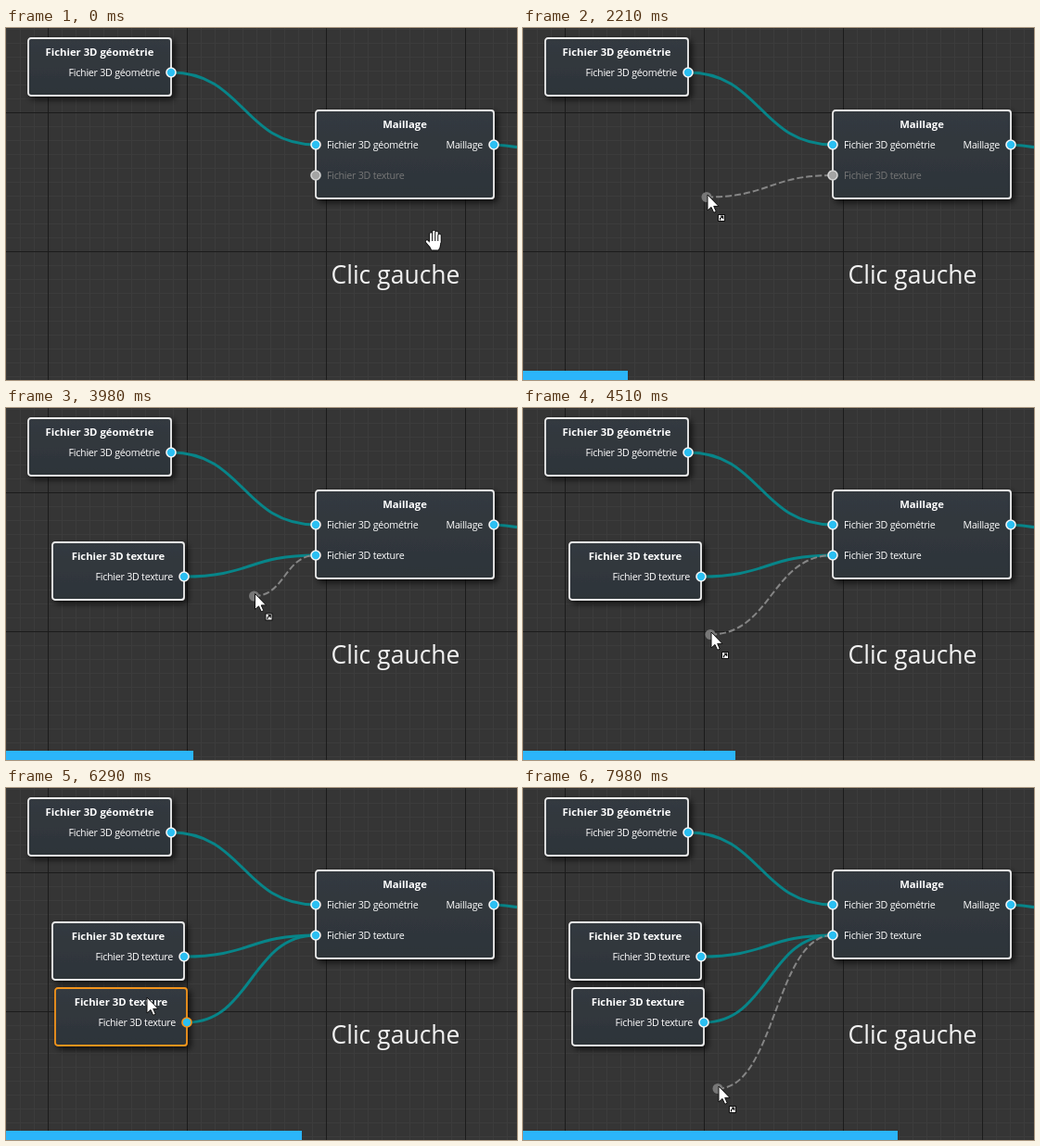
Write an HTML page that moves like this. It is 551 px wide and 380 px high and loops after 8 s.

```html
<!DOCTYPE html>
<html lang="fr">
<head>
<meta charset="utf-8">
<title>Éditeur de nœuds</title>
<style>
  html, body { margin: 0; width: 100%; height: 100%; overflow: hidden; background: #353535; }
  svg { display: block; width: 551px; height: 380px; }
  text { font-family: "Open Sans", "Noto Sans", sans-serif; fill: #fff; }
  .title { font-size: 11.3px; font-weight: 700; text-anchor: middle; }
  .label { font-size: 10.7px; letter-spacing: -.25px; }
  .end { text-anchor: end; }
  .caption { font-size: 26.5px; fill: #f2f2f2; }
  .body { fill: url(#body); stroke: #ececec; stroke-width: 1.8; }
  .port { fill: #2bbff2; stroke: #f4f4f4; stroke-width: 1.6; }
  .wire { fill: none; stroke: #078589; stroke-width: 3; }
  .idle .port { fill: #a4a4a4; stroke: #d4d4d4; }
  .idle text { fill: #777; }
  .selected .body, .selected .port { stroke: #f3941c; }
  .draft path { fill: none; stroke: #858585; stroke-width: 2; stroke-dasharray: 7 3; }
  .draft circle { fill: #777; }
</style>
</head>
<body>
<svg id="stage" viewBox="0 0 551 380">
  <defs>
    <linearGradient id="body" x2="0" y2="1">
      <stop offset="0" stop-color="#343a40"/><stop offset="1" stop-color="#2d3439"/>
    </linearGradient>
    <filter id="shadow" x="-20%" y="-30%" width="150%" height="180%">
      <feDropShadow dx="3" dy="3" stdDeviation="3.5" flood-color="#000" flood-opacity=".75"/>
    </filter>
  </defs>
  <g id="grid" shape-rendering="crispEdges"></g>
  <g id="wires"></g>
  <g id="draft" class="draft"><path/><circle r="5.5"/></g>
  <g id="nodes"></g>
  <text class="caption" x="350.5" y="276">Clic gauche</text>
  <rect id="bar" y="370" height="10" fill="#2bb5fa"/>
  <g id="arrow">
    <path d="M0 0V17L4 13.4 6.7 19.3 9.3 18.2 6.7 12.4H12Z" fill="#fff" stroke="#111" stroke-linejoin="round"/>
    <g id="badge" transform="translate(11 21)">
      <rect x=".5" y=".5" width="7" height="7" fill="#fff" stroke="#111"/>
      <path d="M2.5 6.5V4.5L5 3M3 2.2H5.7V5" fill="none" stroke="#111" stroke-width="1.2"/>
    </g>
  </g>
  <g id="hand" stroke-linecap="round" stroke-linejoin="round"></g>
</svg>
<script>
const LOOP = 8000;
const NS = 'http://www.w3.org/2000/svg';
const $ = id => document.getElementById(id);

function add(parent, tag, attrs = {}, text = '') {
  const el = document.createElementNS(NS, tag);
  for (const k in attrs) el.setAttribute(k, attrs[k]);
  el.textContent = text;
  parent.appendChild(el);
  return el;
}
const show = (el, on) => el.setAttribute('display', on ? 'inline' : 'none');
const move = (el, x, y) => el.setAttribute('transform', `translate(${x} ${y})`);

function curve(x1, y1, x2, y2) {
  const c = Math.min(200, Math.abs(x2 - x1)) / 2;
  return `M${x1} ${y1}C${x1 + c} ${y1} ${x2 - c} ${y2} ${x2} ${y2}`;
}

// Grid: fine lines every 15 px, coarse lines every 150 px
function gridLines(gap, color) {
  let d = '';
  for (let x = 45 % gap; x < 551; x += gap) d += `M${x + .5} 0V380`;
  for (let y = 91 % gap; y < 380; y += gap) d += `M0 ${y + .5}H551`;
  add($('grid'), 'path', { d, stroke: color });
}
gridLines(15, '#3c3c3c');
gridLines(150, '#1b1b1b');

function port(parent, x, y, text, isInput) {
  const g = add(parent, 'g');
  add(g, 'circle', { class: 'port', cx: x, cy: y, r: 5 });
  add(g, 'text', { class: isInput ? 'label' : 'label end', x: x + (isInput ? 12 : -12), y: y + 4 }, text);
  return g;
}

function node(x, y, w, h, title) {
  const el = add($('nodes'), 'g');
  move(el, x, y);
  add(el, 'rect', { class: 'body', width: w, height: h, rx: 3, filter: 'url(#shadow)' });
  add(el, 'text', { class: 'title', x: w / 2, y: 19 }, title);
  return { el, x, y, w, h };
}

const GEO = 'Fichier 3D géométrie', TEX = 'Fichier 3D texture';
const geo = node(24, 11, 154, 62, GEO);
const mesh = node(334, 89, 192, 95, 'Maillage');
const tex1 = node(50, 145, 142, 62, TEX);
const tex2 = node(54, 205, 142, 62, TEX);
port(geo.el, 154, 37, GEO);
port(mesh.el, 0, 37, GEO, true);
port(mesh.el, 192, 37, 'Maillage');
const texIn = port(mesh.el, 0, 70, TEX, true);
for (const n of [tex1, tex2]) port(n.el, 142, 37, TEX);

const wire = d => add($('wires'), 'path', { class: 'wire', d });
wire(curve(178, 48, 334, 126));
wire('M526 126Q540 126.5 553 129');
const wire1 = wire(curve(192, 182, 334, 159));
const wire2 = wire('');

// Open hand: outlined fingers, then the palm
const hand = $('hand');
const palm = 'M-4 1H7.2V4Q7 8 5 10.5H-2Q-3 8 -5.5 4.5Z';
add(hand, 'path', { d: palm, fill: '#111', stroke: '#111', 'stroke-width': 2 });
for (const d of ['M-4 5L-7 1.5', 'M-2.7 2V-6.5', 'M.4 2V-9', 'M3.5 2V-8', 'M6.5 2V-5']) {
  add(hand, 'path', { d, stroke: '#111', 'stroke-width': 4.2 });
  add(hand, 'path', { d, stroke: '#fff', 'stroke-width': 2.4 });
}
add(hand, 'path', { d: palm, fill: '#fff' });

// The screen refreshes in ticks, eleven per block
const BLOCKS = [70, 880, 1740, 2590, 3440, 4280, 5130, 5980, 6830, 7670, 8520];
function tickAt(t) {
  if (t < BLOCKS[0]) return 0;
  const i = BLOCKS.findIndex(b => b > t) - 1;
  const step = (BLOCKS[i + 1] - BLOCKS[i]) / 11;
  return 11 * i + 1 + Math.min(10, Math.floor((t - BLOCKS[i] + 5) / step));
}

// Pointer path: tick, x, y
const PATH = [
  [0, 461, 229], [4, 461, 229], [13, 336, 157], [16, 335, 157], [18, 335, 157],
  [28, 199, 180], [32, 199, 180], [42, 346, 157], [44, 335, 157], [47, 335, 157],
  [57, 202, 244], [59, 203, 242], [62, 203, 242], [71, 153, 215], [74, 153, 215],
  [81, 152, 226], [84, 152, 226], [92, 328, 160], [94, 328, 160], [104, 211, 322], [106, 211, 322]
];
function pointer(n) {
  const i = Math.max(1, PATH.findIndex(p => p[0] >= n));
  const [n0, x0, y0] = PATH[i - 1], [n1, x1, y1] = PATH[i];
  const u = (n - n0) / (n1 - n0), e = u * u * (3 - 2 * u);
  return [x0 + (x1 - x0) * e, y0 + (y1 - y0) * e];
}

const MADE1 = 30, MADE2 = 61, PICK = 74, DROP = 94;
const between = (n, a, b) => n >= a && n < b;
const over = (b, x, y) => x > b.x - 8 && x < b.x + b.w + 8 && y > b.y - 5 && y < b.y + b.h + 5;

function draw(t) {
  const n = tickAt(t), [x, y] = pointer(n);
  const has1 = n >= MADE1, has2 = n >= MADE2;
  const linking = between(n, 19, MADE1) || between(n, 48, MADE2) || n > DROP;

  const u = Math.min(1, Math.max(0, (n - PICK) / 7)), e = u * u * (3 - 2 * u);
  tex2.x = 54 - e;
  tex2.y = 205 + 11 * e;
  move(tex2.el, tex2.x, tex2.y);
  tex2.el.setAttribute('class', between(n, PICK, DROP) ? 'selected' : '');
  wire2.setAttribute('d', curve(tex2.x + 142, tex2.y + 37, 334, 159));
  texIn.setAttribute('class', has1 ? '' : 'idle');
  for (const el of [tex1.el, wire1]) show(el, has1);
  for (const el of [tex2.el, wire2]) show(el, has2);

  const draft = $('draft'), [line, dot] = draft.children;
  show(draft, linking);
  line.setAttribute('d', curve(x - 1, y + 2.5, 334, 159));
  move(dot, x - 1, y + 2.5);

  const boxes = [geo, mesh, ...(has1 ? [tex1] : []), ...(has2 ? [tex2] : [])];
  const arrow = linking || boxes.some(b => over(b, x, y));
  show($('arrow'), arrow);
  show($('hand'), !arrow);
  show($('badge'), linking);
  move($('arrow'), x, y);
  move($('hand'), x, y);
  $('bar').setAttribute('width', Math.round(n * 3.885));
}

const start = performance.now();
function loop() {
  draw((performance.now() - start) % LOOP);
  requestAnimationFrame(loop);
}
loop();
</script>
</body>
</html>
```
